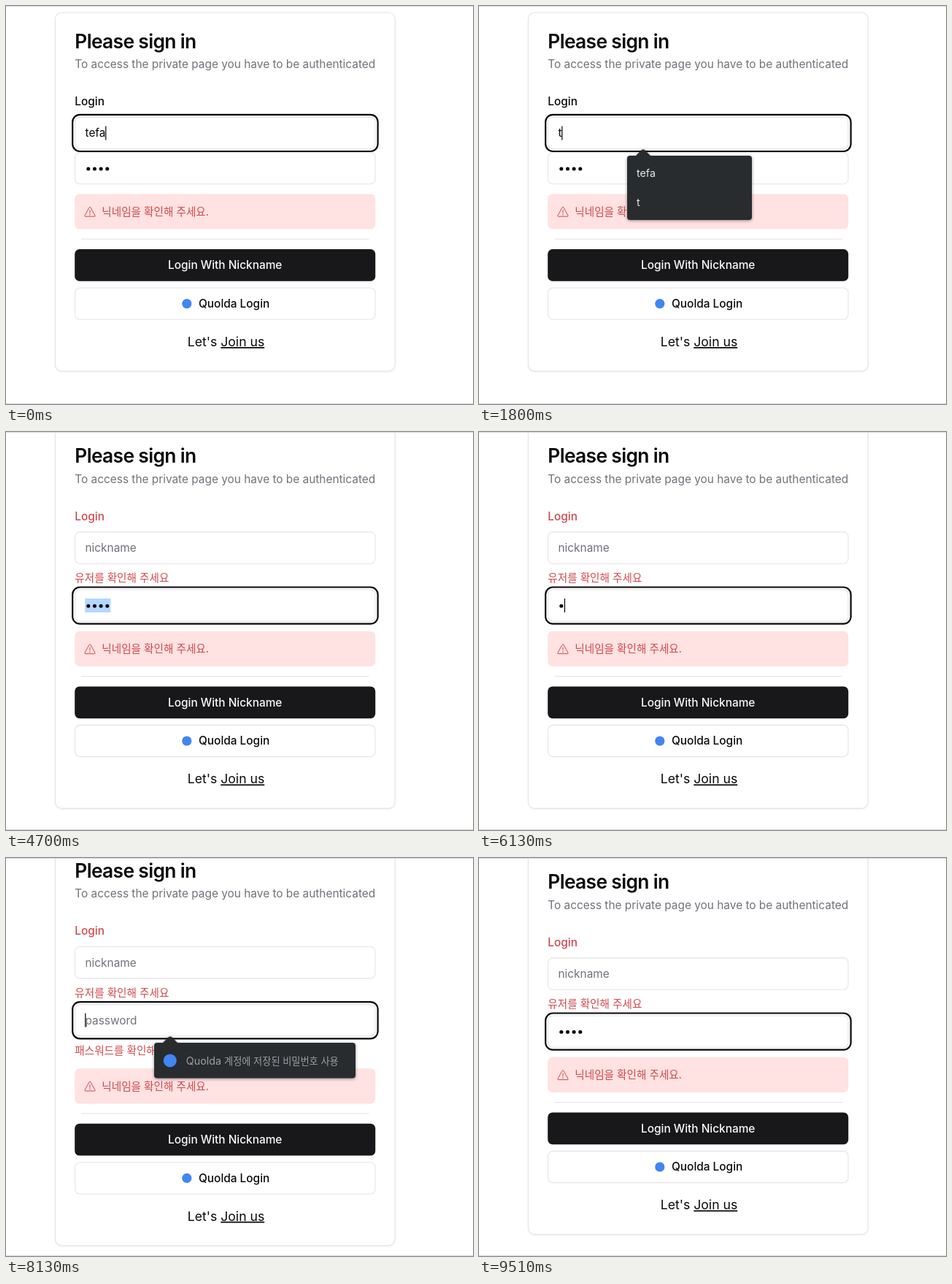
These frames come from a looping animation (640x545 px, 9560 ms). An HTML page:

```html
<!DOCTYPE html>
<html lang="ko">
<head>
<meta charset="utf-8">
<title>Sign in</title>
<style>
  html, body { margin: 0; width: 100%; height: 100%; overflow: hidden; background: #fff; }
  svg { display: block; width: 640px; height: 545px; }
  text { font: 15.4px Inter, sans-serif; font-optical-sizing: none; fill: #09090b; white-space: pre; }
  .title { font-size: 26.4px; font-weight: 600; letter-spacing: -.025em; }
  .muted { fill: #71717a; }
  .medium { font-weight: 500; }
  .ko, .ko tspan { font-family: "Noto Sans CJK KR", "Noto Sans CJK", "Noto Sans KR", sans-serif; font-size: 14.6px; }
  .error { fill: #d0474b; }
  .link { font-size: 17.6px; }
  .box { fill: #fff; stroke: #e4e4e7; stroke-width: 1.1; }
  .card { filter: drop-shadow(0 1px 1px rgba(0, 0, 0, .06)); }
  .ring { fill: none; stroke: #09090b; stroke-width: 2.2; }
  .caret { fill: #000; }
  .popup { filter: drop-shadow(0 1px 2px rgba(0, 0, 0, .4)); }
  .popup rect, .popup path { fill: #282c2f; }
  .popup text { font-size: 14.3px; fill: #e8eaed; }
  .popup .hint { fill: #9aa0a6; }
  .popup .hint tspan { font-family: "Noto Sans CJK KR", "Noto Sans CJK", "Noto Sans KR", sans-serif; font-size: 13.2px; }
  .logo { fill: #4285f4; }
</style>
</head>
<body>
<svg viewBox="0 0 640 545">
  <rect id="card" class="box card" x="67.5" y="9" width="465.6" height="491" rx="8.8"/>

  <g id="top">
    <text class="title" x="94.3" y="57.8">Please sign in</text>
    <text class="muted" x="94.3" y="85">To access the private page you have to be authenticated</text>
    <text id="label" class="medium" x="94.3" y="136">Login</text>
    <rect class="box" x="94.6" y="152.3" width="411.4" height="43.4" rx="6.6"/>
    <rect id="nameRing" class="ring" x="91.2" y="148.8" width="418.4" height="50.2" rx="10"/>
    <text id="nameHint" class="muted" x="108.5" y="179.4">nickname</text>
    <text id="name" x="108.5" y="179.4"></text>
    <rect id="nameCaret" class="caret" y="164.5" width="1.2" height="19"/>
    <text id="nameError" class="ko medium error" x="94.3" y="220.8">유저를 확인해 주세요</text>
  </g>

  <g id="middle">
    <rect class="box" x="94.6" y="200.6" width="411.4" height="43.2" rx="6.6"/>
    <rect id="passRing" class="ring" x="91.2" y="197.1" width="418.4" height="50.2" rx="10"/>
    <rect id="selection" x="108.3" y="212.6" width="35" height="19" fill="#b3d7ff"/>
    <text id="passHint" class="muted" x="108.5" y="227.6">password</text>
    <g id="dots"></g>
    <rect id="passCaret" class="caret" y="212.6" width="1.2" height="19"/>
    <text id="passError" class="ko medium error" x="94.3" y="269">패스워드를 확인해 주세요</text>
  </g>

  <g id="bottom">
    <rect x="94.2" y="257.4" width="412" height="48.2" rx="6.6" fill="#ffe2e1"/>
    <path d="M114.1 275.9 Q115 274.4 115.9 275.9 L122 287 Q122.5 288.2 121.3 288.2 H108.7 Q107.5 288.2 108 287 Z M115 279.6 V283.6"
      fill="none" stroke="#d0474b" stroke-linecap="round"/>
    <circle cx="115" cy="285.8" r=".8" fill="#d0474b"/>
    <text class="ko error" x="131.3" y="286.9">닉네임을 확인해 주세요.</text>
    <rect x="103" y="318.6" width="394.5" height="1.1" fill="#e4e4e7"/>
    <rect x="94.2" y="333" width="412" height="43.8" rx="6.6" fill="#18181b"/>
    <text class="medium" x="300.2" y="360.4" text-anchor="middle" style="fill:#fafafa">Login With Nickname</text>
    <rect class="box" x="94.6" y="386" width="411.4" height="43.2" rx="6.6"/>
    <circle class="logo" cx="247.8" cy="407.6" r="6.6"/>
    <text class="medium" x="264" y="413">Quolda Login</text>
    <text class="link" x="248.8" y="466">Let's <tspan text-decoration="underline">Join us</tspan></text>
  </g>

  <g id="names" class="popup">
    <path d="M214 206 L222.5 197.4 Q225 195.4 227.5 197.4 L236 206 Z"/>
    <rect id="namesBox" x="203" y="205" width="171" rx="4"/>
    <text x="216" y="234.4">tefa</text>
    <text id="second" x="216" y="273.8">t</text>
  </g>
  <g id="saved" class="popup">
    <path d="M214 254 L222.5 245.4 Q225 243.4 227.5 245.4 L236 254 Z"/>
    <rect x="203" y="253" width="276" height="48.6" rx="4"/>
    <circle class="logo" cx="224.8" cy="277.4" r="9"/>
    <text class="hint" x="246.8" y="282.6">Quolda <tspan>계정에 저장된 비밀번호 사용</tspan></text>
  </g>

  <path d="M0 .5 H640 M0 544.5 H640" stroke="#d9d9d9"/>
</svg>

<script>
  const LOOP = 9560, HALF_LINE = 15.4, TEXT_X = 108.5, DOT_STEP = 8.65;
  const NAME = [[0, 'tefa'], [1130, 'tef'], [1470, 'te'], [1730, 't'], [2200, '']];
  const DOTS = [[0, 4], [5500, 3], [5770, 2], [6100, 1], [6430, 0],
                [8230, 1], [8430, 2], [8730, 3], [9000, 4]];
  const ERRORS = [[0, 0], [2200, 1], [6430, 2], [8230, 1]];
  const BLINKS = [200, 700, 1200, 1700, 2230, 2700, 3200, 3700, 3970, 5130, 5630,
                  6130, 6630, 7130, 7630, 8130, 8630, 8730, 9510];
  const TAB = 3970;

  const $ = id => document.getElementById(id);
  const at = (steps, t) => steps.findLast(([start]) => start <= t)[1];
  const show = (id, on) => $(id).setAttribute('visibility', on ? 'visible' : 'hidden');
  const move = (id, y) => $(id).setAttribute('transform', `translate(0 ${y})`);
  const fade = (id, t, from, to) =>
    $(id).setAttribute('opacity', t < from || t >= to ? 0 : Math.min(1, (t - from + 20) / 100));

  for (let i = 0; i < 4; i++) {
    const dot = document.createElementNS('http://www.w3.org/2000/svg', 'circle');
    dot.setAttribute('cx', TEXT_X + DOT_STEP * (i + .5));
    dot.setAttribute('cy', 222.9);
    dot.setAttribute('r', 2.5);
    $('dots').append(dot);
  }

  function draw(t) {
    const name = at(NAME, t), dots = at(DOTS, t), errors = at(ERRORS, t);
    const caretOn = BLINKS.filter(b => b <= t).length % 2 === 0;
    const inName = t < TAB;
    const grow = errors * HALF_LINE;

    // The card stays centred while error lines make it taller.
    $('card').setAttribute('y', 9 - grow);
    $('card').setAttribute('height', 491 + 2 * grow);
    move('top', -grow);
    move('middle', errors === 1 ? HALF_LINE : 0);
    move('bottom', grow);

    $('label').classList.toggle('error', errors > 0);
    show('nameError', errors > 0);
    show('passError', errors > 1);
    show('nameRing', inName);
    show('passRing', !inName);

    $('name').textContent = name;
    show('nameHint', !name);
    show('nameCaret', inName && caretOn);
    $('nameCaret').setAttribute('x', TEXT_X - .3 + (name ? $('name').getComputedTextLength() : 0));

    [...$('dots').children].forEach((dot, i) =>
      dot.setAttribute('visibility', i < dots ? 'visible' : 'hidden'));
    show('passHint', !dots);
    show('selection', t >= TAB && t < 5130);
    show('passCaret', !inName && caretOn);
    $('passCaret').setAttribute('x', TEXT_X - .3 + dots * DOT_STEP);

    const twoRows = t >= 1800;
    fade('names', t, 1130, 2200);
    $('namesBox').setAttribute('height', twoRows ? 88 : 48.6);
    show('second', twoRows);
    fade('saved', t, 6530, 8230);
  }

  const start = performance.now();
  function tick() {
    draw((performance.now() - start) % LOOP);
    requestAnimationFrame(tick);
  }
  tick();
</script>
</body>
</html>
```
